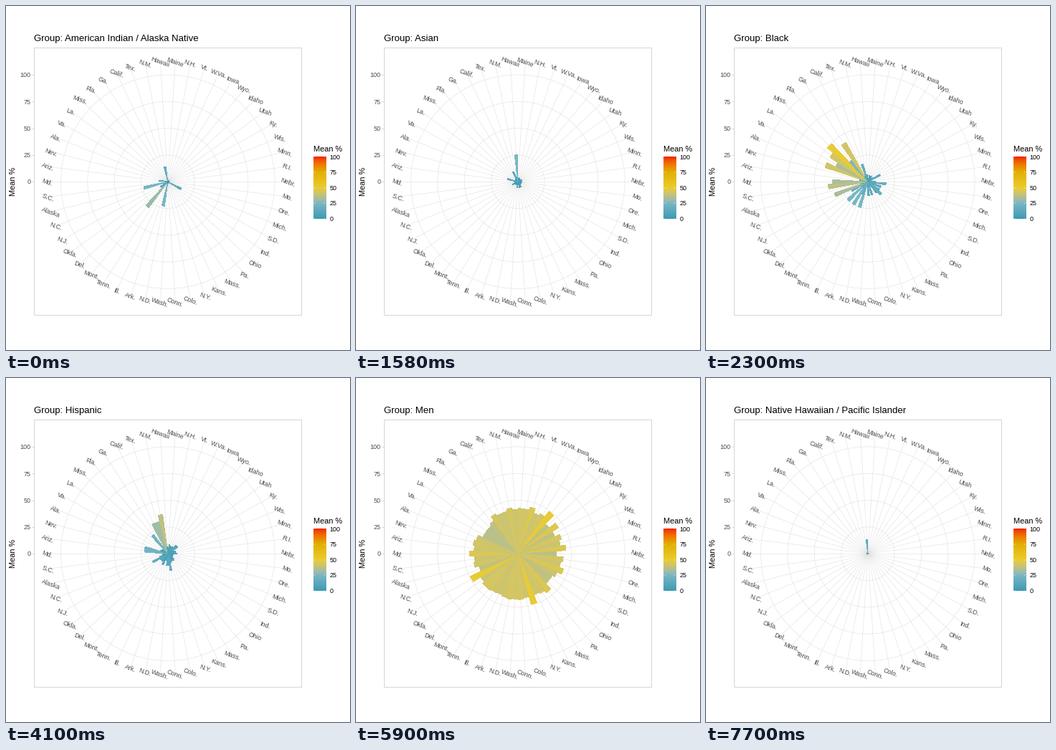
A matplotlib script for the animation above (8000 ms loop, 480 by 480 pixels).

```python
import numpy as np
import matplotlib.pyplot as plt
from matplotlib.animation import FuncAnimation
from matplotlib.collections import LineCollection, PatchCollection
from matplotlib.patches import Circle, Rectangle, Wedge

plt.rcParams.update({"font.family": "Liberation Sans",
                     "text.hinting": "force_autohint"})

SIZE, DPI = 480, 100
PT = 72 / DPI                      # points per pixel
INTERVAL, LOOP = 100, 8000
LEFT, TOP, SIDE = 39.2, 58.6, 373.2
CX, CY = LEFT + SIDE / 2, TOP + SIDE / 2
RADIUS = 0.4 * SIDE                # length of a 100 % bar
LABEL_RADIUS = 0.45 * SIDE
TICKS = (0, 25, 50, 75, 100)
GRID, TICK, AXIS_TEXT = "#dedede", "#b3b3b3", "#4d4d4d"

STATES = """Maine N.H. Vt. W.Va. Iowa Wyo. Idaho Utah Ky. Wis.
Minn. R.I. Nebr. Mo. Ore. Mich. S.D. Ind. Ohio Pa.
Mass. Kans. N.Y. Colo. Conn. Wash. N.D. Ark. Ill. Tenn.
Mont. Del. Okla. N.J. N.C. Alaska S.C. Md. Ariz. Nev.
Ala. Va. La. Miss. Fla. Ga. Calif. Tex. N.M. Hawaii""".split()
STEP = 360 / len(STATES)
ANGLES = (np.arange(len(STATES)) + 0.5) * STEP - 90
rng = np.random.default_rng(4)


def shares(low, high, levels):
    """Random shares in a narrow range, with some states at a set level."""
    values = rng.uniform(low, high, len(STATES))
    for level, names in levels.items():
        for name in names.split():
            values[STATES.index(name)] = level
    return values


# start time in ms, group, shares
SCENES = [
    (0, "American Indian / Alaska Native", shares(0.3, 1.5, {
        30: "Mont.", 23: "N.D. Alaska", 14: "S.D. N.M.", 8: "Okla. Ariz."})),
    (500, "Asian", shares(1, 4, {
        25: "Hawaii", 10: "Calif. Nev.", 5.5: "Wash. N.J. N.Y. Mass."})),
    (2300, "Black", shares(1, 8, {
        49: "Miss.", 42: "Ala. La. Ga.", 37: "S.C.", 33: "Va. Md. N.C.",
        25: "Fla. Del. Tenn. Ark.", 17: "Ohio Mo. N.J. Tex.",
        13: "Ky. Pa. Mich. Ind. Conn. N.Y. Ill."})),
    (4100, "Hispanic", shares(2, 9, {
        37: "N.M.", 31: "Tex. Calif.", 22: "Fla. Ariz. Nev.",
        16: "N.J. Colo.", 11: "Idaho Utah Wash. Conn. Ill."})),
    (5900, "Men", shares(40, 43, {
        49: "Wyo. N.J. N.Y.", 45: "Vt. Utah R.I. Mich. Pa. Md.",
        38: "Idaho Ky. Ind. Ohio N.C. Fla.", 36: "Nebr. Va. La. Miss."})),
    (7700, "Native Hawaiian / Pacific Islander", shares(0.1, 0.6, {
        13: "Hawaii"})),
]

# Colour scale, interpolated in CIE Lab
STOPS = np.array([(59, 154, 178), (120, 183, 197), (235, 204, 42),
                  (225, 175, 0), (242, 26, 0)]) / 255
TO_XYZ = np.array([[0.4124, 0.3576, 0.1805],
                   [0.2126, 0.7152, 0.0722],
                   [0.0193, 0.1192, 0.9505]])
WHITE = TO_XYZ.sum(axis=1)
TO_LAB = np.array([[0, 116, 0], [500, -500, 0], [0, 200, -200]])


def rgb_to_lab(rgb):
    linear = np.where(rgb > 0.04045, ((rgb + 0.055) / 1.055) ** 2.4, rgb / 12.92)
    t = linear @ TO_XYZ.T / WHITE
    f = np.where(t > 0.008856, np.cbrt(t), 7.787 * t + 16 / 116)
    return f @ TO_LAB.T - (16, 0, 0)


def lab_to_rgb(lab):
    f = (lab + (16, 0, 0)) @ np.linalg.inv(TO_LAB).T
    t = np.where(f > 0.2069, f ** 3, (f - 16 / 116) / 7.787)
    linear = np.clip((t * WHITE) @ np.linalg.inv(TO_XYZ).T, 0, 1)
    rgb = np.where(linear > 0.0031308, 1.055 * linear ** (1 / 2.4) - 0.055,
                   12.92 * linear)
    return np.clip(rgb, 0, 1)


LAB_STOPS = rgb_to_lab(STOPS)


def colours(values):
    return lab_to_rgb(np.stack([np.interp(values, TICKS, channel)
                                for channel in LAB_STOPS.T], axis=-1))


fig = plt.figure(figsize=(SIZE / DPI, SIZE / DPI), dpi=DPI, facecolor="white")
ax = fig.add_axes([0, 0, 1, 1])


def text(x, y, string, px, color="black", **kwargs):
    return ax.text(x, y, string, fontsize=px * PT, color=color,
                   rotation_mode="anchor", **kwargs)


def lines(segments, color, width, z):
    ax.add_collection(LineCollection(segments, colors=color,
                                     linewidths=width * PT, zorder=z))


def polar(radius, degrees):
    a = np.radians(degrees)
    return CX + radius * np.cos(a), CY + radius * np.sin(a)


def draw_panel():
    lines([[(CX, CY), polar(LABEL_RADIUS, a)] for a in ANGLES], GRID, 0.53, 1)
    for tick in TICKS:
        r = RADIUS * tick / 100
        ax.add_patch(Circle((CX, CY), r, fill=False, ec=GRID,
                            lw=0.53 * PT, zorder=1))
        lines([[(LEFT - 2.8, CY - r), (LEFT, CY - r)]], TICK, 0.53, 1)
        text(LEFT - 5, CY - r + 3.3, tick, 9, AXIS_TEXT, ha="right")
    for state, angle in zip(STATES, ANGLES):
        text(*polar(LABEL_RADIUS, angle), state, 9, AXIS_TEXT, ha="center",
             va="center_baseline", rotation=-20, zorder=4)
    ax.add_patch(Rectangle((39.5, 58.5), 373, 373, fill=False, snap=False,
                           ec="#d6d6d6", lw=PT, zorder=5))
    text(13, CY, "Mean %", 11, rotation=90, ha="center")


def draw_legend():
    left, right, top, bottom = 429, 446.3, 210.3, 296.7
    ramp = colours(np.linspace(100, 0, 300))[:, None, :]
    ax.imshow(ramp, extent=(left, right, bottom, top), aspect="auto", zorder=2)
    notch = (right - left) / 5
    for tick in TICKS:
        y = bottom + (top - bottom) * tick / 100
        lines([[(left, y), (left + notch, y)], [(right - notch, y), (right, y)]],
              "white", 0.4, 3)
        text(451.8, y + 3.3, tick, 9)
    text(left, 203, "Mean %", 11)


def make_bars(values):
    half = 0.45 * STEP
    wedges = [Wedge((CX, CY), RADIUS * value / 100, a - half, a + half)
              for value, a in zip(values, ANGLES)]
    return ax.add_collection(PatchCollection(
        wedges, facecolors=colours(values), linewidths=0,
        antialiaseds=False, zorder=3))


draw_panel()
draw_legend()
title = text(LEFT, 49.5, "", 13.2)
bars = [make_bars(values) for _, _, values in SCENES]
ax.set(xlim=(0, SIZE), ylim=(SIZE, 0))
ax.axis("off")


def update(frame):
    now = frame * INTERVAL
    current = max(i for i, scene in enumerate(SCENES) if scene[0] <= now)
    title.set_text("Group: " + SCENES[current][1])
    for i, group in enumerate(bars):
        group.set_visible(i == current)
    return [title, *bars]


animation = FuncAnimation(fig, update, frames=LOOP // INTERVAL,
                          interval=INTERVAL, repeat=True, repeat_delay=0)
plt.show()
```
